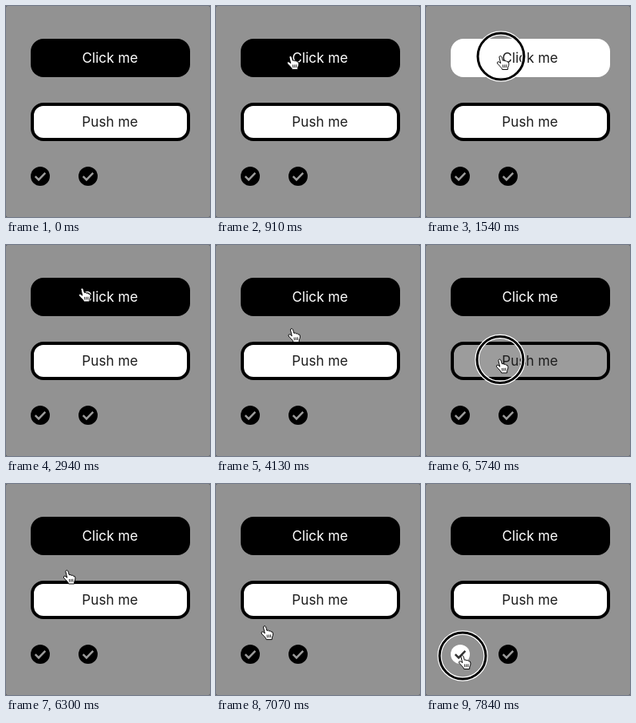
An HTML page that plays this animation: 256 px wide and 264 px high, repeating every 8000 ms.

```html
<!DOCTYPE html>
<html lang="en">
<head>
<meta charset="utf-8">
<title>Inverting buttons</title>
<style>
  html, body { margin: 0; width: 100%; height: 100%; overflow: hidden; background: #555; }
  svg { display: block; width: 100%; height: 100%; }
  text { font: 17.2px Inter, "Open Sans", sans-serif; text-anchor: middle; fill: #1d1d1d; }
  .check { --dot: #000; --tick: #9c9c9c; }
  #solid { fill: #000; }
  #solidLabel { fill: #fff; }
  #outline { fill: #fff; stroke: #000; stroke-width: 4; }
  .solid #solid { fill: #fff; }
  .solid #solidLabel { fill: #1d1d1d; }
  .outline #outline { fill: #9c9c9c; }
  .first #first { --dot: #fff; --tick: #333; }
</style>
</head>
<body>
<svg id="stage" viewBox="0 0 256 264">
  <defs>
    <g id="checkmark">
      <circle r="12" style="fill: var(--dot)"/>
      <path d="M-6.3 .2L-2 4.4L6.3-4.2" style="fill: none; stroke: var(--tick); stroke-width: 2.5"/>
    </g>
  </defs>
  <rect width="256" height="264" rx="2" fill="#929292"/>
  <rect id="solid" x="31" y="41" width="200" height="48" rx="16"/>
  <text id="solidLabel" x="130.5" y="71">Click me</text>
  <rect id="outline" x="33" y="123" width="196" height="44" rx="14"/>
  <text x="130.5" y="151">Push me</text>
  <use id="first" class="check" href="#checkmark" x="43" y="213"/>
  <use class="check" href="#checkmark" x="103" y="213"/>
  <g id="pointer">
    <g id="ring" fill="none">
      <circle r="29" stroke="#fff" stroke-width="5.4"/>
      <circle r="29" stroke="#000" stroke-width="3"/>
    </g>
    <g stroke="#000" transform="scale(.97)">
      <path fill="#fff" stroke-linejoin="round" d="M-2.2 1Q-1.8-.7-.3-.5Q1-.2 1.5 2.3L2.4 5.4Q4.5 4.6 5.1 6Q7.2 5.2 7.7 6.9Q10.2 6.4 10.3 9.4Q10.4 12 9.1 14.2L8.9 17H1.7Q1.2 15-.9 13Q-3.2 11-4.6 9.2Q-5.2 7-3.4 6.9Q-1.9 7.2-.3 9Z"/>
      <path fill="none" stroke-width=".9" d="M2.6 10.8L2.9 14.6M4.9 10.7L5 14.5M7.1 10.6V14.4"/>
    </g>
  </g>
</svg>
<script>
const LOOP = 8000, STEP = 70, GLIDE = 700, BOW = 6;
const stage = document.getElementById('stage');
const pointer = document.getElementById('pointer');
const ring = document.getElementById('ring');

// The pointer leaves for each stop, glides there and presses what it finds.
const entry = { x: 160, y: 130 };
const stops = [
  { leave: 210, x: 94, y: 63, press: 1470, release: 2450, target: 'solid' },
  { leave: 2870, x: 85, y: 31.5, press: 3570, release: 3710 },
  { leave: 3920, x: 93, y: 143.5, press: 4760, release: 5810, target: 'outline' },
  { leave: 5810, x: 76, y: 107.5, press: 6580, release: 6720 },
  { leave: 6860, x: 46, y: 215, press: 7770, release: LOOP, target: 'first' }
];

const easeOut = k => 1 - (1 - k) ** 3;

function draw(now) {
  const t = Math.floor((now % LOOP) / STEP) * STEP;
  const index = stops.findLastIndex(stop => t >= stop.leave);
  const stop = stops[index];
  const pressed = Boolean(stop) && t >= stop.press && t < stop.release;

  pointer.style.display = stop ? '' : 'none';
  ring.style.display = pressed ? '' : 'none';
  stage.setAttribute('class', pressed && stop.target || '');
  if (!stop) return;

  const from = stops[index - 1] || entry;
  const k = easeOut(Math.min(1, (t - stop.leave) / GLIDE));
  const x = from.x + (stop.x - from.x) * k + BOW * Math.sin(Math.PI * k);
  const y = from.y + (stop.y - from.y) * k;
  pointer.setAttribute('transform', `translate(${x} ${y})`);
}

const start = performance.now();
function tick() {
  draw(performance.now() - start);
  requestAnimationFrame(tick);
}
tick();
</script>
</body>
</html>
```
